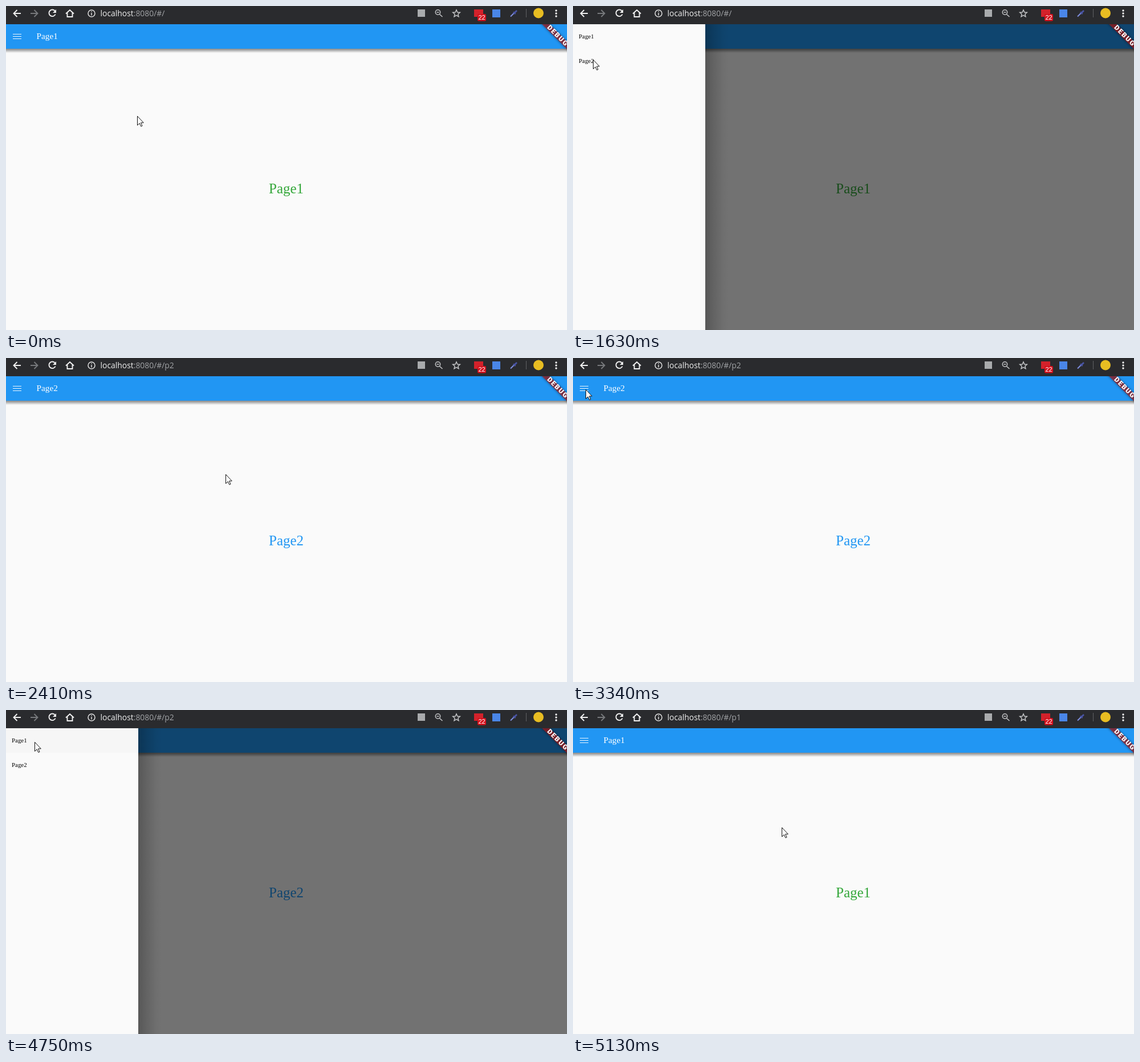
These frames come from a looping animation (984 by 569 pixels, 5280 ms). An HTML page:

```html
<!DOCTYPE html>
<html lang="en">
<head>
<meta charset="utf-8">
<title>Drawer navigation</title>
<style>
  html, body { margin: 0; width: 100%; height: 100%; overflow: hidden; background: #fafafa; }
  svg { display: block; width: 100vw; height: 100vh; }
  .url { font: 13.9px "Open Sans", "Noto Sans", sans-serif; }
  .serif { font-family: "Liberation Serif", "Noto Serif", serif; }
  .badge { font: 11px "Liberation Sans", sans-serif; }
  .debug { font: 900 12px Roboto, sans-serif; letter-spacing: 1.8px; }
  .icon { fill: none; stroke: #f1f1f1; stroke-width: 1.9; }
  .thin { fill: none; stroke: #c4c5c7; stroke-width: 1.5; }
</style>
</head>
<body>
<svg viewBox="0 0 984 569">
  <defs>
    <linearGradient id="below" x2="0" y2="1">
      <stop offset="0" stop-opacity=".45"/>
      <stop offset=".35" stop-opacity=".3"/>
      <stop offset=".8" stop-opacity=".06"/>
      <stop offset="1" stop-opacity="0"/>
    </linearGradient>
    <linearGradient id="beside">
      <stop offset="0" stop-opacity=".24"/>
      <stop offset=".35" stop-opacity=".13"/>
      <stop offset=".75" stop-opacity=".03"/>
      <stop offset="1" stop-opacity="0"/>
    </linearGradient>
    <clipPath id="view"><path d="M0 32H984V569H0z"/></clipPath>
    <filter id="soft" x="-20%" y="-60%" width="140%" height="220%"><feGaussianBlur stdDeviation="2"/></filter>
  </defs>

  <g id="app" clip-path="url(#view)">
    <g id="base"></g>
    <circle id="iconSplash" r="14.5" fill="#fff"/>
    <rect id="scrim" y="32" width="984" height="537"/>
    <g id="drawer">
      <rect x="232" y="32" width="42" height="537" fill="url(#beside)"/>
      <rect y="32" width="232" height="537" fill="#fafafa"/>
      <rect id="tile" width="232" height="43"/>
      <g class="serif" font-size="10.9">
        <text x="10" y="57">Page1</text>
        <text x="10" y="100">Page2</text>
      </g>
      <circle id="tileSplash" r="14.5"/>
    </g>
    <g id="top"></g>
    <g transform="translate(984 32) rotate(45)">
      <rect x="-40" y="21.5" width="80" height="9.5" opacity=".5" filter="url(#soft)"/>
      <rect x="-40" y="21.5" width="80" height="9.5" fill="#b71c1c" fill-opacity=".63"/>
      <text class="debug" x="3" y="29.5" text-anchor="middle" fill="#fff">DEBUG</text>
    </g>
  </g>

  <rect width="984" height="32" fill="#2a2b2e"/>
  <g class="icon">
    <path d="M26 13H14M19.5 7L13.5 13L19.5 19"/>
    <path d="M43 13H55M49.5 7L55.5 13L49.5 19" stroke="#77797c"/>
    <path d="M86 9A5.8 5.8 0 1 0 86.6 14.5"/>
    <path d="M88 6V12H82z" fill="#f1f1f1" stroke="none"/>
    <path d="M105 13.5L112 7L119 13.5M107.5 12V19H116.5V12"/>
  </g>
  <g class="thin">
    <circle cx="150" cy="13" r="6" stroke="#e0e0e0"/>
    <path d="M150 12V16.5M150 9V10.5" stroke="#e0e0e0"/>
    <circle cx="757.5" cy="11" r="4.2"/>
    <path d="M760.5 14.5L765.5 19M755.5 11H759.5"/>
    <path d="M790 6.8L791.8 11L796.3 11.4L792.9 14.3L793.9 18.7L790 16.3L786.1 18.7L787.1 14.3L783.7 11.4L788.2 11z"/>
  </g>
  <text class="url" x="165.5" y="17.5" fill="#f0f0f0">localhost<tspan id="path" fill="#a2a4a7"></tspan></text>
  <rect x="722" y="6" width="13" height="13" fill="#a9abad"/>
  <rect x="821" y="6" width="16" height="13" fill="#d3222b"/>
  <rect x="827" y="14" width="15" height="12.5" rx="2" fill="#d4101c"/>
  <text class="badge" x="834.5" y="24.2" text-anchor="middle" fill="#fff">22</text>
  <rect x="853" y="6" width="14" height="14" fill="#4a86e8"/>
  <path d="M885 18.5L891 12.5" stroke="#7f8fe0" stroke-width="2"/>
  <path d="M890 10.5L893.5 14M892 12L896 8" stroke="#4a55a5" stroke-width="2.6"/>
  <path d="M912.5 5V20" stroke="#5f6164"/>
  <circle cx="934" cy="12.5" r="9" fill="#e8bd22"/>
  <g fill="#f1f1f1">
    <circle cx="965" cy="8" r="1.7"/><circle cx="965" cy="13" r="1.7"/><circle cx="965" cy="18" r="1.7"/>
  </g>

  <path id="cursor" d="M.5.5V16.5L4.2 13L6.8 18.5L9 17.5L6.5 12H11.3z" fill="#fff" stroke="#111"/>
</svg>
<script>
const LOOP = 5280, STEP = 77.65;
const DRAWER_IN = [13, 48], PAGE_IN = [25, 62];
const $ = id => document.getElementById(id);
const set = (id, attrs) => {
  for (const name in attrs) $(id).setAttribute(name, attrs[name]);
};
const clamp = v => Math.min(1, Math.max(0, v));
const smooth = v => v * v * (3 - 2 * v);

// step, x, y of the pointer tip
const POINTER = [
  [0, 230, 193], [6, 19, 53], [15, 19, 53], [19, 44, 104], [21, 35, 94], [26, 35, 94],
  [31, 385, 204], [35, 385, 204], [42, 32, 62], [43, 22, 55], [44, 22, 55], [45, 14, 50],
  [49, 14, 50], [54, 70, 91], [56, 50, 56], [62, 50, 56], [66, 366, 206]
];

const pageMarkup = n => `
  <rect y="32" width="984" height="537" fill="#fafafa"/>
  <rect y="75" width="984" height="8" fill="url(#below)"/>
  <rect y="32" width="984" height="43" fill="#2196f3"/>
  <path d="M12 49.5H27M12 53.5H27M12 57.5H27" stroke="#fff" stroke-opacity=".9"/>
  <g class="serif">
    <text x="53.5" y="58" font-size="15.3" fill="#fff">Page${n}</text>
    <text x="461" y="329" font-size="25" fill="${n === 1 ? '#34a73a' : '#2196f3'}">Page${n}</text>
  </g>`;

function showPage(id, n) {
  const el = $(id);
  if (el.dataset.page === String(n)) return;
  el.dataset.page = n;
  el.innerHTML = pageMarkup(n);
}

function pointerAt(k) {
  const i = POINTER.findIndex(p => p[0] > k);
  if (i < 0) return POINTER[POINTER.length - 1].slice(1);
  const [k0, x0, y0] = POINTER[i - 1], [k1, x1, y1] = POINTER[i];
  const e = smooth((k - k0) / (k1 - k0));
  return [x0 + (x1 - x0) * e, y0 + (y1 - y0) * e];
}

// Critically damped spring, as in a drawer fling
function spring(ms) {
  if (ms <= 0) return 0;
  const u = ms * 0.02236;
  return 1 - (1 + u) * Math.exp(-u);
}

function draw(t) {
  const k = Math.min(67, Math.floor((t + 20) / STEP));
  const second = k >= 29;
  const enter = k >= PAGE_IN[1] ? 1 : 0;
  const p = clamp(((k - PAGE_IN[enter]) * STEP + 20) / 300);
  const entering = k >= PAGE_IN[enter] && p < 1;
  const done = k >= PAGE_IN[1] && p === 1;

  showPage('base', second && !done ? 2 : 1);
  showPage('top', enter ? 1 : 2);
  set('top', {
    opacity: entering ? p * p : 0,
    transform: `translate(0 ${134 * Math.pow(1 - p, 2.4)})`
  });

  const open = done ? 0 : spring((k - DRAWER_IN[second ? 1 : 0]) * STEP + 26);
  set('scrim', { opacity: 0.54 * open });
  set('drawer', {
    transform: `translate(${232 * (open - 1)} 0)`,
    visibility: open > 0 ? 'visible' : 'hidden'
  });

  const [x, y] = pointerAt(k);
  const iconTap = k === 9 || k === 46;
  const tileTap = k === 23 || k === 24 || k === 60;
  const tileHeld = (k >= PAGE_IN[0] && !second) || k >= 61;
  set('iconSplash', { cx: x, cy: y, opacity: iconTap ? 0.1 : 0 });
  set('tileSplash', { cx: x, cy: y, opacity: tileTap ? 0.03 : 0 });
  set('tile', { y: second ? 32 : 75, opacity: tileHeld ? 0.014 : 0 });

  $('path').textContent = ':8080/#/' + (k >= PAGE_IN[1] ? 'p1' : k >= PAGE_IN[0] ? 'p2' : '');
  set('cursor', { transform: `translate(${Math.round(x)} ${Math.round(y)})` });
}

const start = performance.now();
function tick() {
  draw((performance.now() - start) % LOOP);
  requestAnimationFrame(tick);
}
tick();
</script>
</body>
</html>
```
